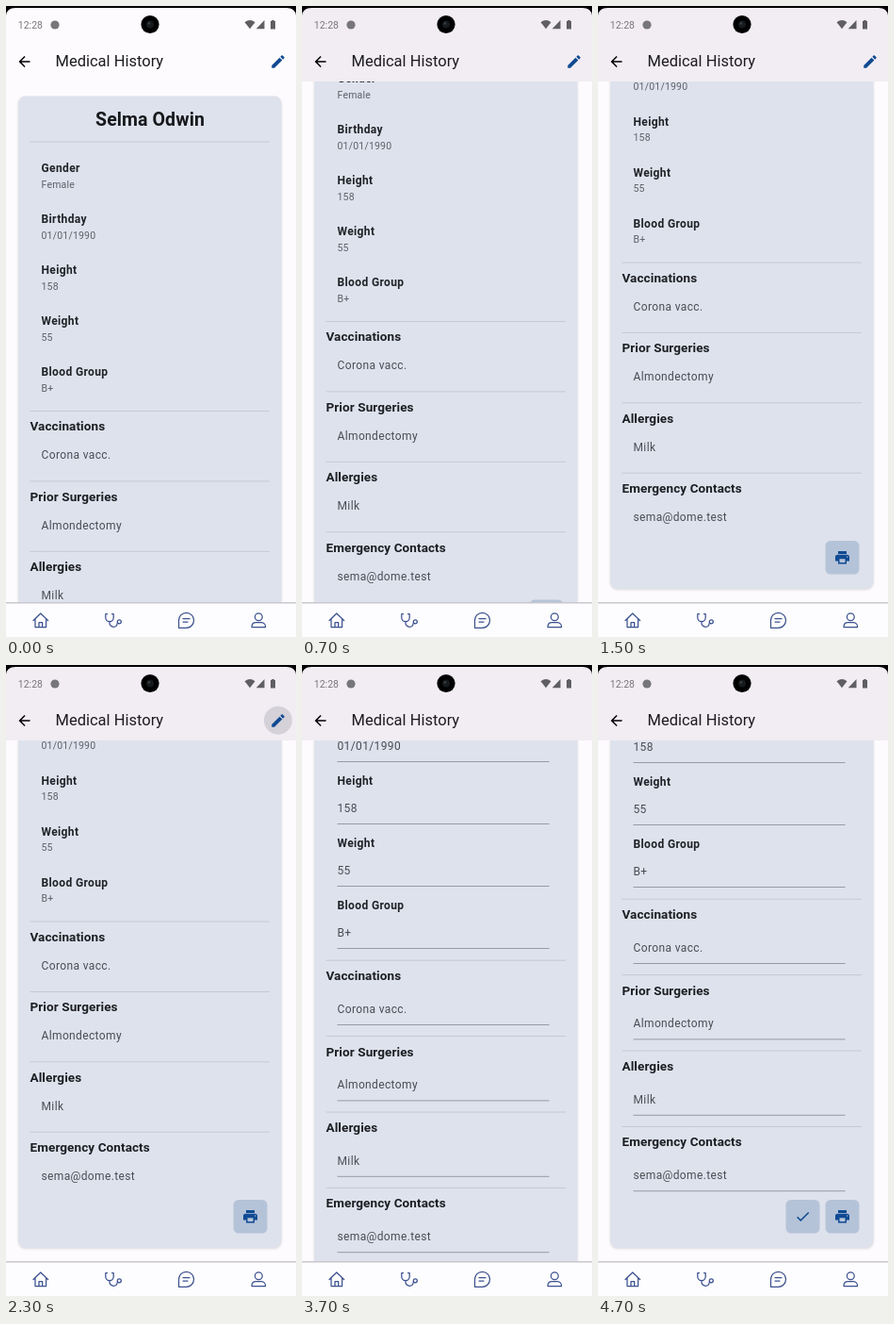
Animation, 308 px wide and 669 px high, one loop 5100 ms. Source, as an HTML page:

```html
<!DOCTYPE html>
<html lang="en">
<head>
<meta charset="utf-8">
<title>Medical History</title>
<style>
html, body { margin: 0; width: 100%; height: 100%; overflow: hidden; background: #fdfbfd; }
svg { display: block; width: 308px; height: 669px; font-family: Roboto, sans-serif; }
.title { font-size: 16.5px; fill: #1c1b1f; }
.clock { font-size: 10.5px; fill: #77767a; }
.name { font-size: 19.5px; font-weight: 700; letter-spacing: .1px; text-anchor: middle; fill: #17181c; }
.label { font-size: 12px; font-weight: 600; letter-spacing: .37px; fill: #202228; }
.head { font-size: 13.5px; font-weight: 600; letter-spacing: .1px; fill: #1c1e23; }
.value { font-size: 12px; letter-spacing: .37px; fill: #494c54; }
.small { font-size: 10.5px; letter-spacing: .19px; fill: #5d6068; }
.card { fill: #dee2ec; filter: drop-shadow(0 1px 1px #0002); }
.rule { stroke: #c6c9d2; }
.field { stroke: #959aa4; }
.button { fill: #b5c3d9; }
.blue { fill: #104a92; }
.nav { fill: none; stroke: #3b528f; stroke-width: 1.25; stroke-linecap: round; stroke-linejoin: round; }
#view, #edit, #bar, #pencil, #splash { animation: 5100ms step-end infinite; }
#view { animation-name: viewScroll; }
#edit { animation-name: editScroll; }
#bar { animation-name: tint; }
#pencil { animation-name: pencil; }
#splash { animation-name: splash; }
@keyframes viewScroll {
  0% { transform: translateY(0); visibility: visible; }
  7.84% { transform: translateY(-2px); }
  9.8% { transform: translateY(-7px); }
  11.76% { transform: translateY(-15px); }
  13.72% { transform: translateY(-95px); }
  15.68% { transform: translateY(-157.5px); visibility: visible; }
  47.05%, 100% { transform: translateY(-157.5px); visibility: hidden; }
}
@keyframes editScroll {
  0% { transform: translateY(0); visibility: hidden; }
  47.05% { transform: translateY(0); visibility: visible; }
  72.54% { transform: translateY(-19px); visibility: visible; }
  76.47%, 100% { transform: translateY(-84px); visibility: visible; }
}
@keyframes tint {
  0% { fill: #fdfbfd; }
  7.84% { fill: #f8f4f8; }
  9.8%, 100% { fill: #f2edf3; }
}
@keyframes pencil {
  0% { visibility: visible; }
  47.05%, 100% { visibility: hidden; }
}
@keyframes splash {
  0% { visibility: hidden; }
  45.09% { visibility: visible; }
  47.05%, 100% { visibility: hidden; }
}
</style>
</head>
<body>
<script>
const patient = "Selma Odwin";
const fields = [["Gender", "Female"], ["Birthday", "01/01/1990"], ["Height", "158"], ["Weight", "55"], ["Blood Group", "B+"]];
const sections = [["Vaccinations", "Corona vacc."], ["Prior Surgeries", "Almondectomy"], ["Allergies", "Milk"], ["Emergency Contacts", "sema@dome.test"]];

const glyphs = {
  back: "M20 11H7.83l5.59-5.59L12 4l-8 8 8 8 1.41-1.41L7.83 13H20z",
  pencil: "M3 17.25V21h3.75L17.81 9.94l-3.75-3.75zM20.71 7.04c.39-.39.39-1.02 0-1.41l-2.34-2.34c-.39-.39-1.02-.39-1.41 0l-1.83 1.83 3.75 3.75z",
  print: "M19 8H5c-1.66 0-3 1.34-3 3v6h4v4h12v-4h4v-6c0-1.66-1.34-3-3-3zm-3 11H8v-5h8zm3-7c-.55 0-1-.45-1-1s.45-1 1-1 1 .45 1 1-.45 1-1 1zm-1-9H6v4h12z",
  check: "M9 16.17L4.83 12l-1.42 1.41L9 19 21 7l-1.41-1.41z"
};

const text = (cls, x, y, str) => `<text class="${cls}" x="${x}" y="${y}">${str}</text>`;
const line = (cls, x1, x2, y) => `<path class="${cls}" d="M${x1} ${y}H${x2}"/>`;
const rule = y => line("rule", 25.5, 280, y);
const glyph = (name, cx, cy, cls = "blue") =>
  `<path class="${cls}" transform="translate(${cx - 9} ${cy - 9}) scale(.75)" d="${glyphs[name]}"/>`;
const card = (top, bottom) =>
  `<rect class="card" x="13" y="${top}" width="279.5" height="${bottom - top}" rx="7.5"/>`;
const button = (name, x, y) =>
  `<rect class="button" x="${x}" y="${y}" width="36" height="35.5" rx="5.5"/>` + glyph(name, x + 18, y + 17.7);

function viewCard() {
  const rows = fields.map(([label, value], i) =>
    text("label", 37.5, 176.2 + 54 * i, label) + text("small", 37.5, 192.6 + 54 * i, value));
  const parts = sections.map(([head, value], i) => {
    const y = 429.5 + 74.4 * i;
    return rule(y) + text("head", 25.5, y + 20.9, head) + text("value", 37.5, y + 50.9, value);
  });
  return card(95.5, 775.5) + text("name", 153, 127.3, patient) + rule(144) +
    rows.join("") + parts.join("") + button("print", 241.5, 724.5);
}

function editCard() {
  const rows = fields.map(([label, value], i) => {
    const y = 14.3 + 66 * i;
    return text("label", 37.5, y, label) + text("value", 37.5, y + 28.6, value) + line("field", 37.5, 262.5, y + 41.2);
  });
  const parts = sections.map(([head, value], i) => {
    const y = 332.2 + 80.4 * i;
    return rule(y) + text("head", 25.5, y + 20.9, head) + text("value", 37.5, y + 55.6, value) +
      line("field", 37.5, 262.5, y + 68.3);
  });
  return card(-90, 702) + rows.join("") + parts.join("") +
    button("check", 199.5, 651) + button("print", 241.5, 651);
}

const appBar = `
  <rect id="bar" width="308" height="80"/>
  ${text("clock", 12.8, 23.8, "12:28")}
  <circle cx="52" cy="20" r="4.6" fill="#77767a"/>
  <g fill="#5f5e62">
    <path d="M253.5 17.2Q259 12.8 264.5 17.2L259 24.3z"/>
    <path d="M274.5 15V24.3H265.7z"/>
    <path d="M281 16H282.2V15H284.8V16H286V24.5H281z"/>
  </g>
  ${glyph("back", 19.5, 59, "ink")}
  ${text("title", 52.5, 64.4, "Medical History")}
  <circle id="splash" cx="289" cy="58.7" r="15" fill="#d4d1d9"/>
  <g id="pencil">${glyph("pencil", 289, 59)}</g>
  <path d="M0 0H308V10Q307 2 298 2H10Q1 2 0 10z"/>
  <circle cx="153" cy="19.5" r="9.6"/>
  <circle cx="153" cy="19.5" r="4" fill="#161a1c"/>
  <circle cx="152" cy="18.5" r="1.2" fill="#39454a"/>`;

const navBar = `
  <rect y="632" width="308" height="37" fill="#fdfcfe"/>
  <path d="M0 632.7H308" stroke="#c9c8cd" stroke-width="1.4"/>
  <g class="nav">
    <path d="M29 651.5L36.8 644L44.6 651.5M31 650V658.5H42.6V650M35 658.5V653.5H38.6V658.5"/>
    <path d="M107.5 644.5H105.8V648.5A4.2 4.2 0 0 0 114.2 648.5V644.5H112.5M110 652.7V654A4.2 4.2 0 0 0 114.2 658.3C117 658.3 118 656.5 118.2 654.5"/>
    <circle cx="120.3" cy="652.8" r="2"/>
    <path d="M183.5 659.3V651.3A8 8 0 1 1 191.5 659.3zM188 649.5H195M188 653H193"/>
    <circle cx="268.3" cy="647.8" r="3.9"/>
    <path d="M261 658.5C261 655 263.5 653.7 265.5 653.7H271C273 653.7 275.6 655 275.6 658.5z"/>
  </g>`;

document.body.innerHTML = `<svg viewBox="0 0 308 669">
  <rect width="308" height="669" fill="#fdfbfd"/>
  <g id="view">${viewCard()}</g>
  <g id="edit">${editCard()}</g>
  ${appBar}${navBar}</svg>`;
</script>
</body>
</html>
```
